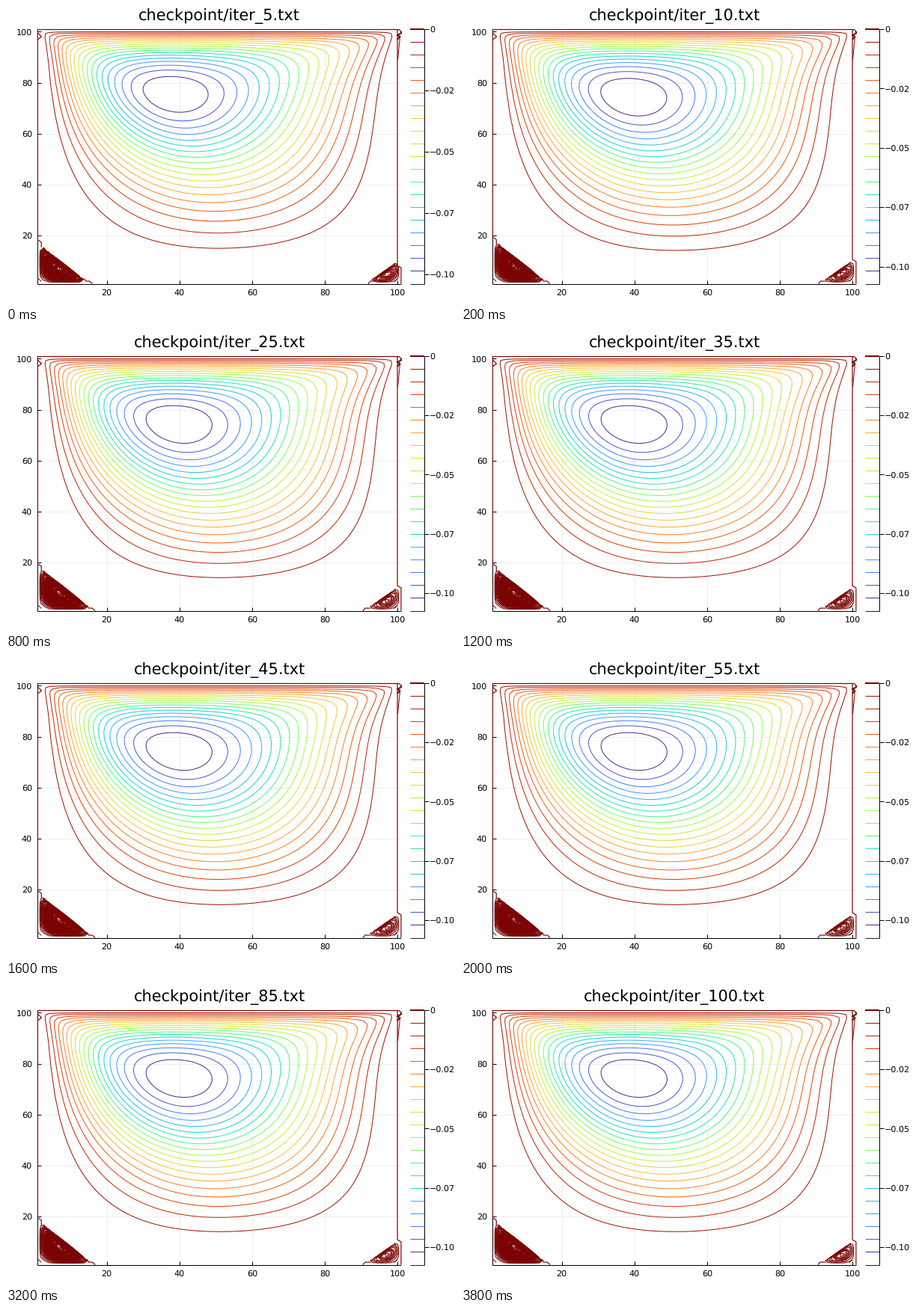
A matplotlib script that plays this animation: 600 px wide and 400 px high, repeating every 4000 ms.

```python
import numpy as np
import matplotlib.pyplot as plt
from matplotlib.animation import FuncAnimation

plt.rcParams["text.hinting"] = "none"

W, H = 600, 400
LEFT, RIGHT, TOP, BOTTOM = 42.4, 528, 31, 371.5
BAR_L, BAR_R = 540, 558.5
DARK = "#7a0403"
PEAK = 0.1075        # settled depth of the main vortex
START = 0.9656       # depth at iteration 5, relative to PEAK
TURBO = plt.get_cmap("turbo")


def px(x):
    return LEFT + (x - 1) * 4.855


def py(y):
    return BOTTOM - (y - 1) * 3.405


def cavity(n=80, re=100, dt=0.003, end=16, every=33):
    """Lid-driven cavity started from rest; stream function snapshots."""
    h = 1 / n
    k = np.arange(1, n)
    sine = np.sqrt(2 / n) * np.sin(np.pi * np.outer(k, k) / n)
    lam = 4 / h**2 * np.sin(np.pi * k / (2 * n)) ** 2
    inv = 1 / (lam[:, None] + lam[None, :])
    psi = np.zeros((n + 1, n + 1))
    w = np.zeros_like(psi)
    shots = []
    for step in range(1, int(end / dt) + 1):
        w[0] = -2 * psi[1] / h**2
        w[-1] = -2 * (psi[-2] + h) / h**2
        w[:, 0] = -2 * psi[:, 1] / h**2
        w[:, -1] = -2 * psi[:, -2] / h**2
        mid = w[1:-1, 1:-1]
        up, down = w[2:, 1:-1], w[:-2, 1:-1]
        east, west = w[1:-1, 2:], w[1:-1, :-2]
        u = (psi[2:, 1:-1] - psi[:-2, 1:-1]) / (2 * h)
        v = (psi[1:-1, :-2] - psi[1:-1, 2:]) / (2 * h)
        diffuse = (up + down + east + west - 4 * mid) / (re * h * h)
        advect = (u * (east - west) + v * (up - down)) / (2 * h)
        w[1:-1, 1:-1] = mid + dt * (diffuse - advect)
        psi[1:-1, 1:-1] = sine @ ((sine @ w[1:-1, 1:-1] @ sine) * inv) @ sine
        if step % every == 0:
            shots.append(psi.copy())
    return np.array(shots)


shots = cavity()
depth = -shots.min(axis=(1, 2))
shots *= PEAK / depth[-1]
depth *= PEAK / depth[-1]
first = int(np.argmax(depth >= START * PEAK))

# Walls lie half a cell inside the outermost grid points; the lid runs left
unit = np.linspace(0, 1, shots.shape[1])
GX, GY = np.meshgrid(px(100.5 - 99 * unit), py(1.5 + 99 * unit))

fig = plt.figure(figsize=(W / 100, H / 100), dpi=100, facecolor="white")
ax = fig.add_axes([0, 0, 1, 1])
ax.axis("off")


def line(pts, color=DARK, width=1.0, z=4):
    xs, ys = zip(*pts)
    return ax.plot(xs, ys, color=color, lw=width * 0.72, zorder=z,
                   solid_capstyle="butt", solid_joinstyle="round")[0]


def label(x, y, s, size=8, ha="center"):
    return ax.text(x, y, s, fontsize=size, ha=ha, va="baseline",
                   family="DejaVu Sans", color="black")


# Axes, grid and the wall outline
for t in range(20, 101, 20):
    x, y = px(t), py(t)
    line([(x, TOP), (x, BOTTOM)], "#eeeeee", z=1)
    line([(LEFT, y), (RIGHT, y)], "#eeeeee", z=1)
    line([(x, BOTTOM), (x, BOTTOM - 5)], "black", z=5)
    line([(LEFT, y), (LEFT + 5, y)], "black", z=5)
    label(x, 387, str(t))
    label(35, y + 4, str(t), ha="right")
line([(LEFT, BOTTOM), (RIGHT, BOTTOM)], "black")
line([(LEFT, TOP), (LEFT, BOTTOM)], "black", z=3)
line([(BAR_R, TOP), (BAR_R, BOTTOM)], "black", z=5)
line([(LEFT, TOP + .5), (525, TOP + .5), (RIGHT, 34)], width=1.2)
line([(RIGHT, 34), (RIGHT, 36.5), (523, 39), (526.5, 41), (523, 45)],
     width=2)
line([(526.5, 41), (523.5, 72)])
line([(LEFT, 36), (47.5, 41), (LEFT, 45)], width=1.2)
line([(LEFT, 364), (47.3, 368.5)])
line([(518.5, 368.5), (523, 365)])
title = label(285, 19, "", size=15)

moving = []


def draw(i):
    while moving:
        moving.pop().remove()
    n = 5 * (i + 1)
    at = min(first * n // 5, len(shots) - 1)
    psi = shots[at]
    low = psi.min()
    settled = np.clip((depth[at] / PEAK - START) / (1 - START), 0, 1)
    title.set_text(f"checkpoint/iter_{n}.txt")

    levels = np.linspace(low, 0, 21)
    moving.append(ax.contour(GX, GY, psi, levels=levels[1:-1], cmap=TURBO,
                             vmin=low, vmax=0, linewidths=0.72,
                             linestyles="solid", zorder=3))
    eddies = psi.max() * np.linspace(0.01, 0.985, 56)
    moving.append(ax.contour(GX, GY, psi, levels=eddies, colors=DARK,
                             linewidths=0.8, zorder=3))

    # Zero line along the walls, stepping inwards around the corner eddies
    e = 18 + 1.2 * settled
    b = 16 + 0.8 * settled
    r = 8 + 2.8 * settled
    s = 92 - 1.5 * settled
    walls = [
        [(1, 101), (1, e), (1.3, e), (2, e - 0.8), (2, e - 2.8)],
        [(b - 2.2, 3), (b - 1.8, 2), (b - 0.8, 2), (b, 1)],
        [(100, 101), (100, r), (101, r - 0.8), (101, 1)],
        [(s, 1), (s + 0.6, 2), (s + 2.2, 2)],
    ]
    for pts in walls:
        moving.append(line([(px(x), py(y)) for x, y in pts], width=1.2))

    # Colour bar
    def bar_y(v):
        return TOP + (BOTTOM - TOP) * v / low

    for v in levels:
        moving.append(line([(BAR_L, bar_y(v)), (BAR_R, bar_y(v))],
                           TURBO(1 - v / low), 2 if v == 0 else 1))
    for k in range(5):
        y = bar_y(-0.025 * k)
        moving.append(line([(BAR_R, y), (BAR_R + 6, y)], "black", z=5))
        text = f"\u2212{0.025 * k:.3f}" if k else "0"
        moving.append(label(566, y + 4, text, ha="left"))

    ax.set_xlim(0, W)
    ax.set_ylim(H, 0)
    return moving


anim = FuncAnimation(fig, draw, frames=20, interval=200, repeat=True,
                     repeat_delay=0, init_func=lambda: [], blit=False)
plt.show()
```
